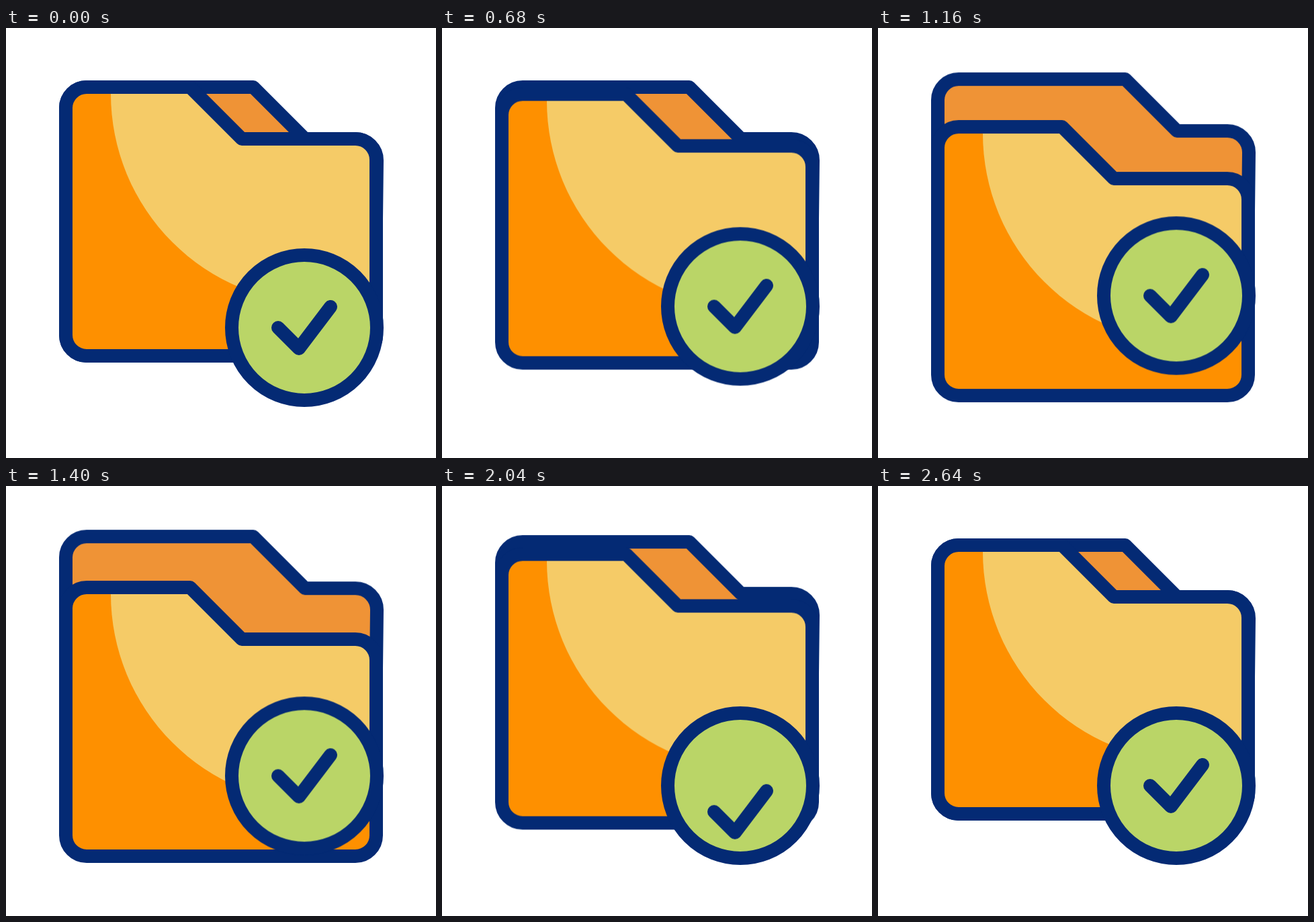
An HTML page without scripts for the animation above (3 s loop, 640 px wide and 640 px high).

```html
<!DOCTYPE html>
<html lang="en">
<head>
<meta charset="utf-8">
<title>Folder with check mark</title>
<style>
  html, body { margin: 0; width: 100%; height: 100%; overflow: hidden; background: #fff; }
  svg { display: block; width: 100vw; height: 100vh; }

  .line { stroke: #042a74; stroke-width: 20; stroke-linecap: round; stroke-linejoin: round; }

  .back, .front, .badge, .tick {
    animation: 3s cubic-bezier(.333, 0, .667, 1) infinite;
  }
  .back { animation-name: back; }
  .front { animation-name: front; }
  .badge { animation-name: badge; }
  .tick { animation-name: tick; }

  @keyframes back {
    0%, 23.17%, 75%, 100% { transform: translateY(0); }
    41.83%, 58.33% { transform: translateY(-12.8px); }
  }
  @keyframes front {
    0%, 15.67%, 74.07%, 100% { transform: translateY(0); }
    42.83%, 53.8% { transform: translateY(63px); }
  }
  @keyframes badge {
    0%, 12%, 53.33%, 100% { transform: translateY(0); }
    32.67% { transform: translateY(-60px); }
  }
  @keyframes tick {
    0%, 53.33%, 83.33%, 100% { transform: translateY(0); }
    60.67% { transform: translateY(-28px); }
    68.67% { transform: translateY(40px); }
  }
</style>
</head>
<body>
<svg viewBox="0 0 640 640">
  <defs>
    <path id="pocket" d="M120 88H274L351 165H520A31 31 0 0 1 551 196V457A31 31 0 0 1 520 488H120A31 31 0 0 1 89 457V119A31 31 0 0 1 120 88Z"/>
    <clipPath id="inside"><use href="#pocket"/></clipPath>
  </defs>

  <path class="back line" fill="#ef9336" d="M120 88H368L445 165H520A32 32 0 0 1 552 197L551 285V457A31 31 0 0 1 520 488H120A31 31 0 0 1 89 457V119A31 31 0 0 1 120 88Z"/>

  <g class="front">
    <use href="#pocket" fill="#fe9000"/>
    <circle cx="468" cy="98" r="312" fill="#f5cb67" clip-path="url(#inside)"/>
    <use href="#pocket" class="line" fill="none"/>
  </g>

  <g class="badge">
    <circle class="line" cx="444" cy="446" r="108" fill="#bad567"/>
    <path class="tick line" fill="none" d="M405 446L436 477L483 415"/>
  </g>
</svg>
</body>
</html>
```
